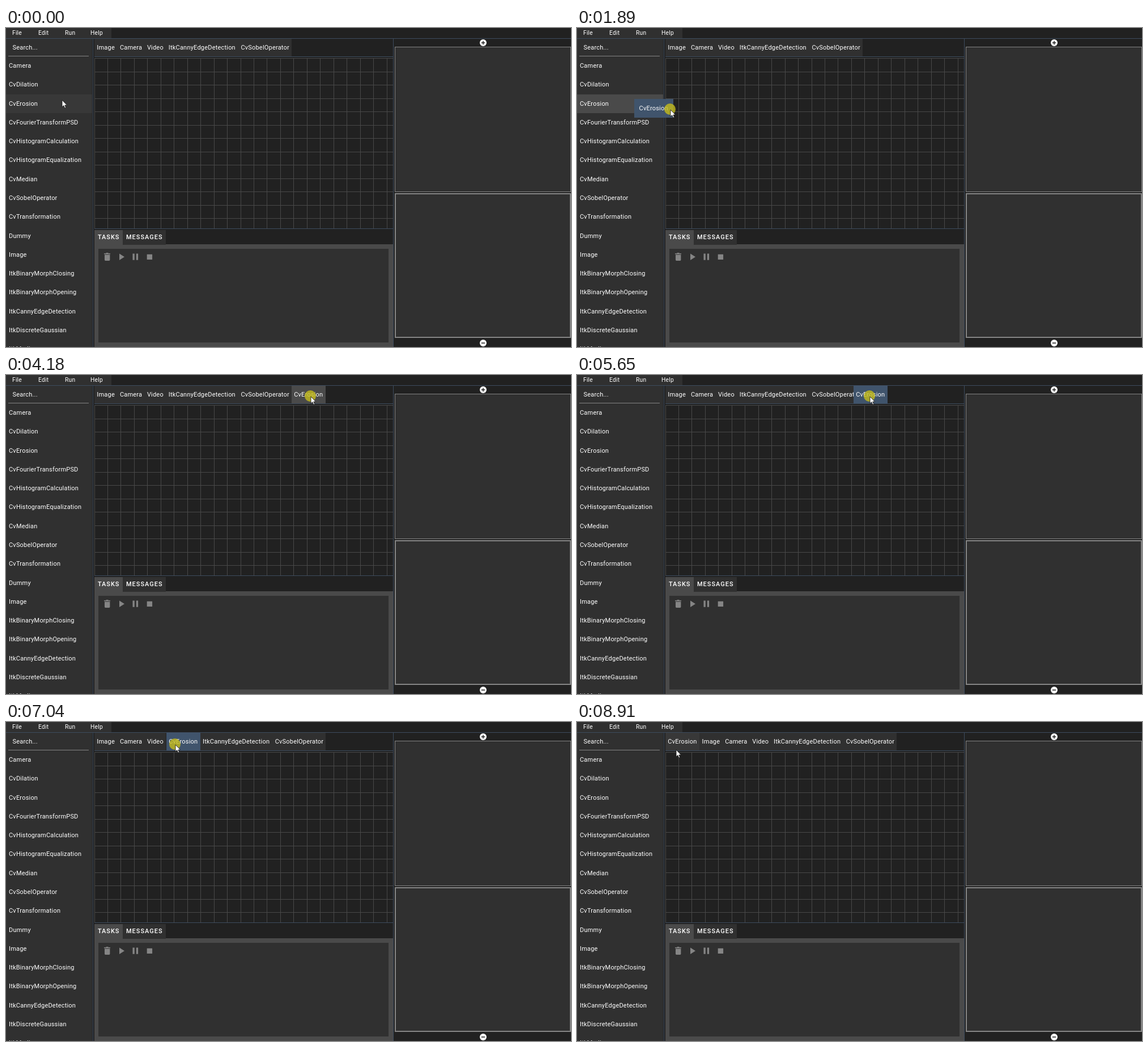
An HTML page that plays this animation: 997 px wide and 562 px high, repeating every 9.17 s.

```html
<!DOCTYPE html>
<html lang="en">
<head>
<meta charset="utf-8">
<title>Drag an operator into the pipeline</title>
<style>
html, body { margin: 0; width: 100%; height: 100%; overflow: hidden; background: #212121; }
#stage { position: relative; width: 997px; height: 562px; overflow: hidden; background: #212121;
  color: #fff; font: 11px Roboto, sans-serif; letter-spacing: .2px; white-space: nowrap; }
#stage div, svg { position: absolute; }
.menu { left: 0; top: 0; width: 186px; height: 18px; background: #303030; font-size: 10.3px; line-height: 17px; }
.side { left: 0; top: 19px; width: 152px; height: 543px; background: #303030; }
.search { left: 11.5px; top: 19px; line-height: 31px; }
.row { left: 0; width: 147px; height: 33.3px; padding-left: 5px; line-height: 33.3px; }
.rule { background: #3d4c5e; }
.tab { top: 19px; height: 31px; line-height: 31px; text-indent: 4.5px; background: #303030; }
#ghost { left: 0; top: 0; width: 69px; height: 33px; line-height: 33px; text-indent: 8.6px; background: #40546c; }
.label { top: 356px; height: 26px; line-height: 25px; font-weight: 500; letter-spacing: .98px; text-indent: 6px; }
.tasks { left: 156px; top: 381px; width: 512px; height: 165px; border: solid #4a4a4a; border-width: 8px 8px 8px 7px; background: #303030; }
.view { left: 686px; width: 311px; box-sizing: border-box; background: #303030; border: 1px solid #858585; }
#dot { left: -11px; top: -11px; width: 20px; height: 20px; border-radius: 50%; background: rgba(196, 187, 28, .8); }
#pointer { left: 0; top: 0; }
</style>
</head>
<body>
<div id="stage">
  <div class="menu"></div>
  <div class="side"></div>
  <div class="search">Search...</div>
  <div style="left:4px;top:49px;width:142px;height:1px;background:#858585"></div>
  <div id="rows"></div>

  <div class="rule" style="left:0;top:18px;width:997px;height:1px"></div>
  <div class="rule" style="left:153px;top:19px;width:1px;height:543px"></div>
  <div class="rule" style="left:156px;top:50px;width:527px;height:1px"></div>
  <div class="rule" style="left:156px;top:353px;width:527px;height:1px"></div>
  <div class="rule" style="left:683px;top:19px;width:1px;height:543px"></div>

  <div class="view" style="top:33px;height:256px"></div>
  <div class="view" style="top:291px;height:255px;border-width:2px"></div>

  <div class="tasks"></div>
  <div class="label" style="left:156px;width:50px;background:#4a4a4a">TASKS</div>
  <div class="label" style="left:206px;width:76px;background:#303030">MESSAGES</div>

  <svg width="997" height="562">
    <path id="grid" fill="none" stroke="#484848"/>
    <g fill="#858585">
      <path d="M173 397h3l1-1h3l1 1h3v1.6h-11zM174 399.6h9.4v9q0 1.4-1.4 1.4h-6.6q-1.4 0-1.4-1.4z"/>
      <path d="M200 397.5l9 5.8-9 5.8z"/>
      <path d="M223.5 397.5h3.3v11.3h-3.3zM229.8 397.5h3.3v11.3h-3.3zM248.7 398.7h9.4v9.4h-9.4z"/>
    </g>
    <g fill="#fff"><circle cx="842" cy="26" r="6"/><circle cx="842" cy="555" r="6"/></g>
    <path d="M838.8 26h6.4M842 22.8v6.4M838.8 555h6.4" stroke="#212121" stroke-width="1.5"/>
  </svg>

  <div id="tabs"></div>
  <div id="ghost">CvErosion</div>
  <div id="pointer">
    <div id="dot"></div>
    <svg width="12" height="17" viewBox="-1 -1 12 17" style="left:-1px;top:-1px">
      <path d="M0 0V12.2L2.8 9.6L4.8 14.2L6.7 13.3L4.8 9H8.6Z" fill="#fff" stroke="#111" stroke-width=".8"/>
    </svg>
  </div>
</div>
<script>
const LOOP = 9170, STEP = 69.5;
const $ = id => document.getElementById(id);

function add(parent, cls, text, style) {
  const el = document.createElement('div');
  el.className = cls;
  el.textContent = text;
  Object.assign(el.style, style);
  parent.append(el);
  return el;
}

// Static parts
[['File', 11], ['Edit', 57], ['Run', 104], ['Help', 149]].forEach(([text, x]) =>
  add(document.querySelector('.menu'), '', text, { left: x + 'px' }));

const rows = ['Camera', 'CvDilation', 'CvErosion', 'CvFourierTransformPSD', 'CvHistogramCalculation',
  'CvHistogramEqualization', 'CvMedian', 'CvSobelOperator', 'CvTransformation', 'Dummy', 'Image',
  'ItkBinaryMorphClosing', 'ItkBinaryMorphOpening', 'ItkCannyEdgeDetection', 'ItkDiscreteGaussian', 'ItkMedian']
  .map((name, i) => add($('rows'), 'row', name, { top: 50 + 33.28 * i + 'px' }));

let grid = '';
for (let i = 0; i < 23; i++) grid += `M${Math.round(155.5 + 23.46 * i) + .5} 53V353`;
for (let i = 0; i < 13; i++) grid += `M156 ${Math.round(53 + 23.5 * i) + .5}H683`;
$('grid').setAttribute('d', grid);

const TAB_W = 60.3;
const tabs = [['Image', 155.8, 40.7], ['Camera', 196.4, 48.1], ['Video', 244.4, 38],
  ['ItkCannyEdgeDetection', 282.3, 127.7], ['CvSobelOperator', 409.9, 93.9]]
  .map(([name, x, w]) => ({ x, w, el: add($('tabs'), 'tab', name, { width: w + 'px' }) }));
const newTab = add($('tabs'), 'tab', 'CvErosion', { width: TAB_W + 'px' });

// Smooth monotone curve through [step, x, y] points
function curve(pts) {
  const axis = a => {
    const slope = pts.slice(1).map((p, i) => (p[a] - pts[i][a]) / (p[0] - pts[i][0]));
    const tan = pts.map((_, i) => {
      const l = slope[i - 1] || 0, r = slope[i] || 0;
      return l * r > 0 ? 2 * l * r / (l + r) : 0;
    });
    return k => {
      k = Math.min(Math.max(k, pts[0][0]), pts[pts.length - 1][0]);
      const i = Math.max(0, pts.findIndex(p => p[0] >= k) - 1);
      const p = pts[i], q = pts[i + 1], h = q[0] - p[0], u = (k - p[0]) / h, v = 1 - u;
      return v * v * (1 + 2 * u) * p[a] + u * u * (3 - 2 * u) * q[a]
        + h * u * v * (v * tan[i] - u * tan[i + 1]);
    };
  };
  const x = axis(1), y = axis(2);
  return k => [x(k), y(k)];
}

const pointerIn = curve([[-1, 99, 127], [3, 136, 143], [4, 165, 144], [8, 375, 102], [11, 505, 57], [12, 520, 50], [15, 528, 36]]);
const ghostIn = curve([[-1, 64, 117], [4, 101, 125], [9, 340, 78], [12, 470, 34], [13, 486, 24], [16, 493, 14]]);
const pointerSort = curve([[-1, 538, 38], [12, 406, 37], [14, 385, 38], [25, 284, 41], [33, 238, 46], [39, 204, 49], [45, 175, 49]]);
const tabSort = curve([[-1, 503.7, 0], [13, 383, 0], [14, 372, 0], [27, 250, 0], [33, 215, 0], [41, 170, 0], [44, 155.8, 0]]);

const stepAt = (t, start) => Math.max(-1, Math.floor((t - start) / STEP + .15));
const move = (el, [x, y]) => el.style.transform = `translate(${Math.round(x)}px, ${Math.round(y)}px)`;
const show = (el, on) => el.style.visibility = on ? 'visible' : 'hidden';

function pointerAt(t) {
  if (t < 3570) return pointerIn(stepAt(t, 1600));
  if (t < 3640) return [533, 37];
  return pointerSort(stepAt(t, 5440));
}

function tabColor(t) {
  if (t < 3570) return '#303030';
  if (t < 4180) return '#383838';
  if (t < 4980) return '#4a4a4a';
  return t < 8910 ? '#40546c' : '#383838';
}

function draw(t) {
  move($('pointer'), pointerAt(t));
  show($('dot'), t >= 270 && t < 3110 || t >= 4180 && t < 8910);

  rows[2].style.background = t < 270 ? '#383838' : t < 3110 ? '#4a4a4a' : 'none';
  show($('ghost'), t >= 1070 && t < 3110);
  move($('ghost'), ghostIn(stepAt(t, 1600)));

  const x = tabSort(stepAt(t, 5440))[0], grab = x + 34;
  show(newTab, t >= 3110);
  newTab.style.left = x + 'px';
  newTab.style.background = tabColor(t);

  // A tab makes room once the grabbed point enters it
  for (const tab of tabs) {
    const passed = grab < tab.x + tab.w - .5;
    tab.el.style.left = tab.x + (passed ? TAB_W : 0) + 'px';
  }
}

const start = performance.now();
(function tick() {
  draw((performance.now() - start) % LOOP);
  requestAnimationFrame(tick);
})();
</script>
</body>
</html>
```
